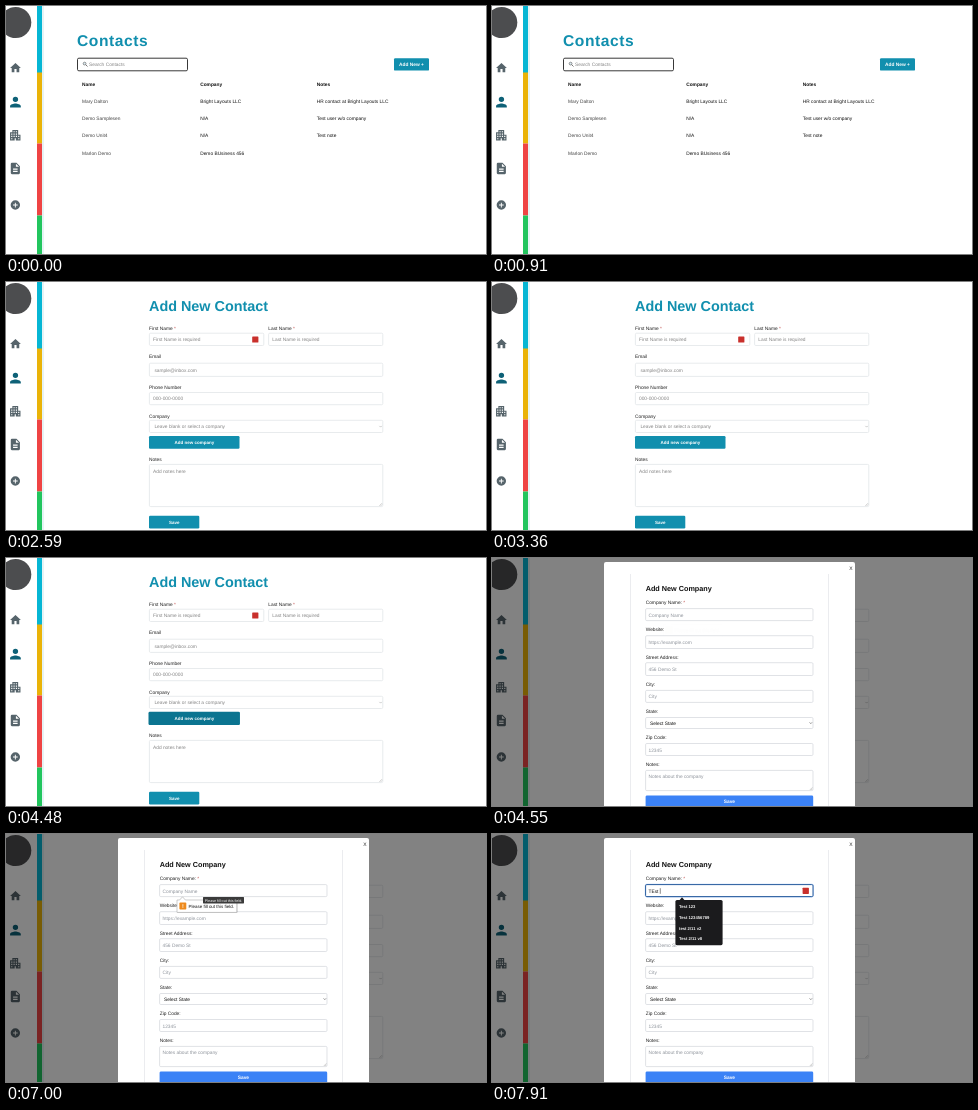
An HTML page for the animation above (8000 ms loop, 480x248 px).

```html
<!DOCTYPE html>
<html lang="en">
<head>
<meta charset="utf-8">
<title>Contacts</title>
<style>
  html, body { margin: 0; width: 100%; height: 100%; overflow: hidden; background: #fff; }
  svg { display: block; width: 480px; height: 248px; }
  text { font-family: "Liberation Sans", Arial, sans-serif; white-space: pre; text-rendering: geometricPrecision; }
</style>
</head>
<body>
<svg id="stage" viewBox="0 0 480 248"></svg>
<script>
const SIZE = 4.83, TEAL = '#118fae', GRAY = '#858585', INK = '#222', RED = '#c9302c';
const LOOP = 8000;

const text = (x, y, str, { size = SIZE, fill = INK, bold = false, extra = '' } = {}) =>
  `<text x="${x}" y="${y}" font-size="${size}" fill="${fill}" font-weight="${bold ? 700 : 400}" ${extra}>${str}</text>`;
const rect = (x, y, w, h, fill, extra = '') =>
  `<rect x="${x}" y="${y}" width="${w}" height="${h}" fill="${fill}" ${extra}/>`;
const path = (d, fill, extra = '') => `<path d="${d}" fill="${fill}" ${extra}/>`;
const group = (id, body) => `<g id="${id}">${body}</g>`;
const centered = (x, y, str, size = 4.5) =>
  text(x, y, str, { size, fill: '#fff', bold: true, extra: 'text-anchor="middle"' });

// Outlined input with a placeholder
const field = (x, y, w, h, hint, hintX, hintY, fill = GRAY, line = '#dfe2e6') =>
  rect(x, y, w, h, '#fff', `rx="1.2" stroke="${line}" stroke-width=".7"`) + text(hintX, hintY, hint, { fill });
const label = (x, y, str, required) =>
  text(x, y, str + (required ? ' <tspan fill="#c0504d">*</tspan>' : ''));
const chevron = (x, y, color) =>
  path(`M${x - 1.2} ${y - .6}l1.2 1.2 1.2-1.2`, 'none', `stroke="${color}" stroke-width=".6"`);
const grip = (x, y) =>
  path(`M${x - 2.6} ${y}l2.6-2.6M${x - 1.2} ${y}l1.2-1.2`, 'none', 'stroke="#888" stroke-width=".4"');

function sidebar() {
  const icon = (x, y, scale, d, fill = '#56646b') =>
    path(d, fill, `fill-rule="evenodd" transform="translate(${x} ${y}) scale(${scale})"`);
  let windows = '';
  for (const [x, y, n] of [[5, 9, 3], [9, 5, 3], [13, 5, 3], [17, 13, 2]])
    for (let i = 0; i < n; i++) windows += `M${x} ${y + 4 * i}h2v2h-2z`;
  return '<circle cx="9.7" cy="16.5" r="15.6" fill="#4c4d4f"/>' +
    icon(3, 55.5, .54, 'M10 20v-6h4v6h5v-8h3L12 3 2 12h3v8z') +
    icon(1.4, 88, .67, 'M12 12a4 4 0 1 0 0-8 4 4 0 0 0 0 8zm0 2c-2.67 0-8 1.34-8 4v2h16v-2c0-2.66-5.33-4-8-4z', '#0e6177') +
    icon(2.3, 122.3, .58, 'M17 11V3H7v4H3v14h8v-4h2v4h8V11z' + windows) +
    icon(2.5, 155.7, .57, 'M14 2H6a2 2 0 0 0-2 2v16a2 2 0 0 0 2 2h12a2 2 0 0 0 2-2V8zm2 16H8v-2h8zm0-4H8v-2h8zm-3-5V3.5L18.5 9z') +
    icon(3.7, 193.4, .47, 'M12 2a10 10 0 1 0 0 20 10 10 0 0 0 0-20zm5 11h-4v4h-2v-4H7v-2h4V7h2v4h4z') +
    rect(36, 0, 2, 248, '#9ccdd8', 'opacity=".25"') +
    rect(31, 0, 5, 67, '#06b6d4') + rect(31, 66.5, 5, 71, '#eab308') +
    rect(31, 137.5, 5, 72, '#ef4444') + rect(31, 209.5, 5, 39, '#22c55e');
}

function contactsPage() {
  const columns = [76, 194.2, 310.8];
  const rows = [
    ['Mary Dalton', 'Bright Layouts LLC', 'HR contact at Bright Layouts LLC'],
    ['Demo Samplesen', 'N/A', 'Test user w/o company'],
    ['Demo Unit4', 'N/A', 'Test note'],
    ['Marlon Demo', 'Demo BUsiness 456', ''],
  ];
  return text(71, 39.8, 'Contacts', { size: 15.6, fill: TEAL, bold: true, extra: 'letter-spacing=".55"' }) +
    rect(71.5, 52.2, 110, 12.6, '#fff', 'rx="1.4" stroke="#222" stroke-width=".9"') +
    '<circle cx="78.6" cy="57.6" r="1.4" fill="#dcebf2" stroke="#555" stroke-width=".6"/>' +
    path('M79.7 58.7l1.8 1.8', 'none', 'stroke="#555" stroke-width=".8"') +
    text(83, 60, 'Search Contacts', { fill: GRAY }) +
    rect(388, 52.2, 35, 12.4, TEAL, 'rx="1.2"') +
    rect(388, 52.2, 35, 12.4, '#06b6d4', 'rx="1.2" id="addHover"') +
    centered(405.5, 60, 'Add New +', SIZE) +
    ['Name', 'Company', 'Notes'].map((s, i) => text(columns[i], 79.6, s, { fill: '#111', bold: true })).join('') +
    rows.map((row, r) => row.map((s, i) =>
      text(columns[i], 96.9 + r * 17.25, s, { fill: i ? '#111' : '#444' })).join('')).join('');
}

function contactForm() {
  return text(143, 29.4, 'Add New Contact', { size: 14.4, fill: TEAL, bold: true }) +
    label(143, 47.7, 'First Name', true) + label(262.3, 47.7, 'Last Name', true) +
    field(143.4, 51.2, 114.4, 12.3, 'First Name is required', 147, 59.1) +
    rect(246.2, 54.4, 6.2, 6.2, RED, 'rx=".6"') +
    field(262.6, 51.2, 114.2, 12.3, 'Last Name is required', 266.3, 59.1) +
    label(143, 76, 'Email') + field(143.4, 81.2, 233.4, 13.2, 'sample@inbox.com', 148.4, 89.6) +
    label(143, 107.2, 'Phone Number') + field(143.4, 110.5, 233.4, 12.2, '000-000-0000', 147, 118.4) +
    label(143, 135.8, 'Company') +
    field(143.4, 138.3, 233.4, 12.2, 'Leave blank or select a company', 148.4, 146.2) + chevron(374.6, 144.5, '#aaa') +
    rect(143, 154, 90.5, 12.8, TEAL, 'rx="1.2"') +
    rect(142.5, 153.7, 91.4, 13.4, '#0b7490', 'rx="1.4" id="companyHover"') +
    centered(188.3, 162, 'Add new company') +
    label(143, 179.4, 'Notes') + field(143.4, 182.4, 233.4, 42.2, 'Add notes here', 147, 190.7) + grip(376, 223.8) +
    rect(143, 233.8, 50.3, 12.6, TEAL, 'rx="1.2"') + centered(168.2, 241.8, 'Save');
}

function companyModal() {
  const rows = [
    ['Company Name:', 45.9, 50.6, 12, 'Company Name'],
    ['Website:', 73.2, 77.7, 12.8, 'https://example.com'],
    ['Street Address:', 100.5, 104.7, 12.8, '456 Demo St'],
    ['City:', 127.6, 132.4, 12, 'City'],
    ['State:', 154.8, 159.5, 11, ''],
    ['Zip Code:', 181.2, 185.5, 12, '12345'],
    ['Notes:', 208.2, 212.4, 20.2, 'Notes about the company'],
  ];
  return rect(0, 0, 480, 248, '#000', 'opacity=".49"') +
    rect(112, 4, 251, 250, '#fff', 'rx="2"') +
    rect(138.2, 16, .7, 232, '#e2e4e8') + rect(336.2, 16, .7, 232, '#e2e4e8') +
    text(357.2, 11.8, 'X', { size: 5 }) +
    text(153.7, 33.4, 'Add New Company', { size: 7.25, fill: '#111', bold: true }) +
    rows.map(([name, base, y, h, hint], i) => label(153.7, base, name, i === 0) +
      field(153.6, y, 167.4, h, hint, 156.5, y + 8 - (i === 3 ? .2 : 0), '#8f949c', '#d3d6db')).join('') +
    text(158, 166.8, 'Select State', { fill: '#111' }) + chevron(318.8, 165, '#444') + grip(320.4, 232) +
    rect(153.6, 237.4, 167.6, 14, '#3b82f6', 'rx="1.4"') + centered(237.4, 245, 'Save', SIZE) +
    group('bubble',
      rect(171.3, 66.4, 60.2, 12.6, '#000', 'rx="1" opacity=".18"') +
      path('M171 66h2.6l2.9-3.2 2.9 3.2h51.4v12.4h-59.8z', '#fff', 'stroke="#999" stroke-width=".5"') +
      rect(173.4, 68.6, 6.9, 6.9, '#ee8a1d', 'rx=".8"') + centered(176.85, 74, '!', 5.5) +
      text(182.6, 73.8, 'Please fill out this field.', { size: 4.47, fill: '#111' })) +
    group('tooltip',
      rect(197, 63, 41, 6.4, '#3b3b3b', 'rx=".6"') +
      text(198.8, 67.5, 'Please fill out this field.', { size: 3.7, fill: '#fff' })) +
    group('focus',
      rect(152.8, 49.8, 169, 13.6, '#bcd4f5', 'rx="1.8"') +
      rect(153.6, 50.6, 167.4, 12, '#fff', 'rx="1.2" stroke="#285c9e" stroke-width="1"') +
      text(156.5, 58.6, '', { fill: '#111', extra: 'id="typed"' }) +
      rect(0, 54.2, .5, 5.6, '#111', 'id="caret"') +
      rect(310.6, 53.7, 6.3, 6.2, RED, 'rx=".6"')) +
    group('suggest',
      path('M187.2 66.4l2.8-3.2 2.8 3.2z', '#1b1b1d') +
      rect(183.4, 66, 47.2, 45.2, '#1b1b1d', 'rx="1.6"') +
      ['Test 123', 'Test 123456789', 'test 2/11 v2', 'Test 2/11 v8'].map((s, i) =>
        text(187, 73.6 + i * 10.95, s, { size: 4.2, fill: '#f4f4f4', bold: true })).join(''));
}

const $ = id => document.getElementById(id);
$('stage').innerHTML = rect(0, 0, 480, 248, '#fff') + sidebar() +
  group('contacts', contactsPage()) + group('form', contactForm()) + group('modal', companyModal());

const ramp = (t, start, length) => Math.min(1, Math.max(0, (t - start) / length));
const show = (id, on) => $(id).style.display = on ? '' : 'none';
const fade = (id, amount) => $(id).setAttribute('opacity', amount);
const keyTimes = [7420, 7490, 7630, 7840, 7910];

function draw(t) {
  show('contacts', t < 2590);
  show('form', t >= 2590);
  show('modal', t >= 4550);
  show('focus', t >= 7420);
  show('suggest', t >= 7490);
  fade('addHover', ramp(t, 1330, 210));
  fade('companyHover', ramp(t, 3710, 210));
  fade('bubble', t < 7420 ? ramp(t, 4550, 350) : 0);
  fade('tooltip', t < 7420 ? ramp(t, 6300, 210) : 0);
  const typed = $('typed');
  typed.textContent = 'TEst '.slice(0, keyTimes.filter(k => t >= k).length);
  if (t >= 7420) $('caret').setAttribute('x', 156.6 + typed.getComputedTextLength());
}

const begin = performance.now();
function tick() {
  draw((performance.now() - begin) % LOOP);
  requestAnimationFrame(tick);
}
tick();
</script>
</body>
</html>
```
